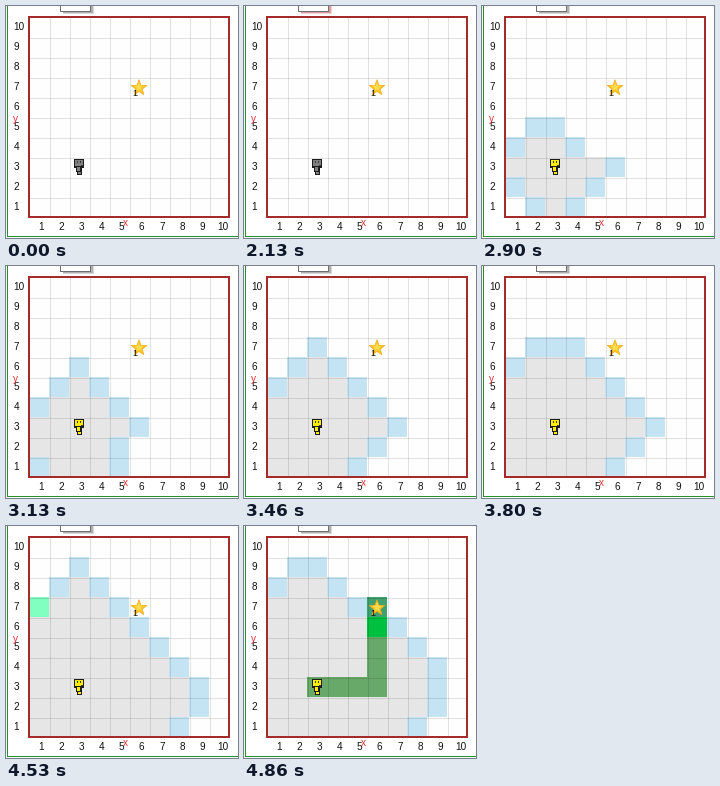
A matplotlib script for the animation above (6360 ms loop, 232 by 232 pixels).

```python
import matplotlib.pyplot as plt
import numpy as np
from matplotlib.animation import FuncAnimation
from matplotlib.patches import Polygon, Rectangle

SIZE, DPI = 232, 64
LOOP, INTERVAL = 6360, 10
PX = 72 / DPI
N, CELL, LEFT, TOP = 10, 20, 23, 11
START, GOAL = (3, 3), (6, 7)
DEFERRED = (9, 3)  # cell the search leaves for last
STEPS = ((0, -1), (-1, 0), (1, 0), (0, 1))
EMPTY, FRONTIER, VISITED, CURRENT = "#fefefe", "#c4e4f4", "#e6e6e6", "#80ffc0"
PATH, PATH_CURRENT, PATH_GOAL = "#68a868", "#00c040", "#40a070"

# Tick of the 30 Hz clock against number of search events done
TICKS = [2, 15, 30, 50, 51, 64, 78]
EVENTS = [1, 17, 40, 74, 74, 92, 111]


def rgb(color):
    return tuple(int(color[i:i + 2], 16) / 255 for i in (1, 3, 5))


def search():
    """Breadth-first search: list of {cell: colour} states, and the path."""
    parent, queue, colors = {START: None}, [START], {}
    states = []
    while queue:
        cell = queue.pop(0)
        if cell == DEFERRED:
            queue.append(cell)
            continue
        states.append({**colors, cell: CURRENT})
        colors[cell] = VISITED
        count = len(states)
        for dx, dy in STEPS:
            near = cell[0] + dx, cell[1] + dy
            if near in parent or not all(1 <= v <= N for v in near):
                continue
            parent[near] = cell
            if near == GOAL:
                path = [GOAL]
                while parent[path[-1]]:
                    path.append(parent[path[-1]])
                return states, path
            queue.append(near)
            colors[near] = FRONTIER
            states.append(dict(colors))
        if len(states) == count:
            states.append(dict(colors))


states, path = search()

fig = plt.figure(figsize=(SIZE / DPI, SIZE / DPI), dpi=DPI, facecolor="white")
ax = fig.add_axes([0, 0, 1, 1])


def rect(x0, y0, x1, y1, color, z=5):
    patch = Rectangle((x0, y0), x1 - x0, y1 - y0, fc=color, lw=0,
                      antialiased=False, zorder=z)
    return ax.add_patch(patch)


def label(x, y, text, color="#111111", size=10):
    ax.text(x, y, text, color=color, fontsize=size * PX, ha="center",
            va="center", family="Liberation Sans", zorder=8)


def star(x, y, radius, color, edge="none"):
    angle = np.arange(10) * np.pi / 5 - np.pi / 2
    r = np.where(np.arange(10) % 2, 0.42, 1) * radius
    points = np.column_stack([x + r * np.cos(angle), y + r * np.sin(angle)])
    ax.add_patch(Polygon(points, fc=color, ec=edge, lw=0.6 * PX, zorder=6))


board = ax.imshow(np.ones((N, N, 3)), interpolation="nearest", zorder=1,
                  extent=(LEFT, LEFT + N * CELL, TOP + N * CELL, TOP))
ax.set(xlim=(0, SIZE), ylim=(SIZE, 0), aspect="auto")
ax.axis("off")

# Page edges and grid
rect(1, 0, 2, 231, "#289028")
rect(1, 230, SIZE, 231, "#289028")
for i in range(1, N):
    x, y = LEFT + i * CELL + 0.5, TOP + i * CELL + 0.5
    for xs, ys in (((x, x), (TOP, TOP + N * CELL)),
                   ((LEFT, LEFT + N * CELL), (y, y))):
        ax.plot(xs, ys, color="black", alpha=0.11, lw=PX, zorder=2,
                antialiased=False)
ax.add_patch(Rectangle((LEFT, TOP), N * CELL, N * CELL, fill=False,
                       ec="#a52a2a", lw=2 * PX, zorder=4))

for i in range(1, N + 1):
    label(14.5 + i * 20.2, 221.5, str(i))
    label(12.5 if i == N else 10.5, 221 - i * 20, str(i))
label(9.5, 113, "y", "#e03030")
label(119.5, 217, "x", "#e03030")

# Panel with a drop shadow, cut off by the top edge
shadow = [rect(57, 0, 88, 8, "#d8d8d8"), rect(57, 0, 87, 7, "#b0b0b0")]
rect(54, 0, 85, 6, "#707070")
rect(55, 0, 84, 5, "white")

star(133, 82, 8.3, "#ffc61e", "#eda51c")
star(133, 81.3, 4.8, "#ffdc50")
label(129, 87, "1", size=9)

# Robot: outline parts, then parts that light up
for box in ((68, 153, 78, 162), (70, 161, 76, 166), (71, 165, 76, 169)):
    rect(*box, "#1c1c1c", 6)
lit = [rect(*box, "#808080", 7) for box in
       ((69, 154, 77, 160), (71, 161, 74, 165), (72, 166, 75, 168))]
for box in ((71, 155, 72, 157), (74, 155, 75, 157), (75, 159, 77, 160)):
    rect(*box, "#3c3c3c", 8)


def draw(frame):
    tick = int((frame * INTERVAL - 2130 + 5) * 0.03 // 1)
    colors = {}
    if tick >= 2:
        event = int(np.interp(tick, TICKS, EVENTS) + 1e-6)
        colors = dict(states[min(event, len(states) - 1)])
    if tick >= 78:
        for cell in path[:1 + 2 * (tick - 78)]:
            colors[cell] = PATH
        colors[GOAL] = PATH_GOAL
        if tick > 78:
            colors[path[1]] = PATH_CURRENT
    pixels = np.full((N, N, 3), rgb(EMPTY))
    for (x, y), color in colors.items():
        pixels[N - y, x - 1] = rgb(color)
    board.set_data(pixels)
    for part in lit:
        part.set_facecolor("#ffee00" if tick >= 2 else "#808080")
    flash = 0 <= tick < 2
    shadow[0].set_facecolor("#f4d0d0" if flash else "#d8d8d8")
    shadow[1].set_facecolor("#dca0a0" if flash else "#b0b0b0")
    return [board, *lit, *shadow]


anim = FuncAnimation(fig, draw, frames=LOOP // INTERVAL, interval=INTERVAL,
                     repeat=True, repeat_delay=0, blit=False)
plt.show()
```
